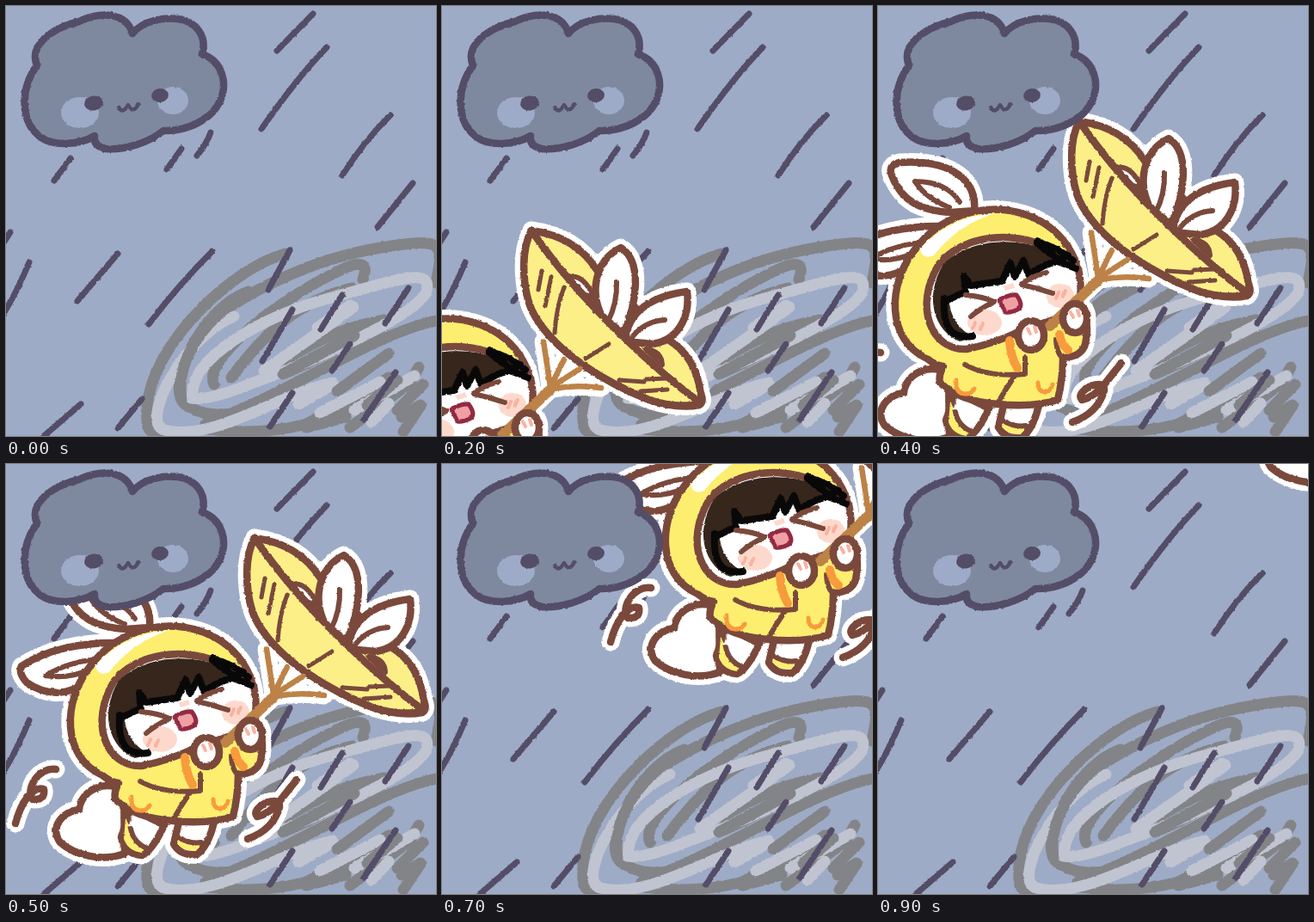
An HTML page for the animation above (1000 ms loop, 500x500 px).

```html
<!DOCTYPE html>
<html lang="en">
<head>
<meta charset="utf-8">
<title>Blown away by the storm</title>
<style>
  html, body { margin: 0; width: 100%; height: 100%; overflow: hidden; background: #9eabc6; }
  svg { display: block; width: 100vw; height: 100vh; }
  path, ellipse { fill: none; stroke-linecap: round; stroke-linejoin: round; }
  .rough { filter: url(#rough); }
  .dark { stroke: #838488; stroke-width: 13; }
  .light { stroke: #c0c4d1; stroke-width: 13; }
  .rain { stroke: #544d68; stroke-width: 7; }
  .cloud { fill: #7e899f; stroke: #544d68; stroke-width: 8.5; }
  .blush { fill: #9eabc8; }
  .eye { fill: #544d68; }
  .line { stroke: #7a493c; stroke-width: 8.5; }
  .thin { stroke: #7a493c; stroke-width: 6; }
  .white { fill: #fff; }
  .yellow { fill: #fdee70; }
  .pale { fill: #fdef88; }
  .pink { fill: #fdd9cd; }
  .orange { stroke: #f79b3c; stroke-width: 5; }
  .cuff { stroke: #f79b3c; stroke-width: 10; }
  .wood { stroke: #bd8247; stroke-width: 6.5; }
  .pole { stroke: #bd8247; stroke-width: 12; }
  .hair { fill: #36261c; }
  .black { stroke: #090808; stroke-width: 8; }
  .mouth { fill: #f0a0a4; stroke: #932a42; stroke-width: 5; }
  .mark { stroke: #f9b29f; stroke-width: 4; }
  .halo * { stroke: #fff; stroke-width: 21; }
  .halo .in { display: none; }
</style>
</head>
<body>
<svg viewBox="0 0 500 500">
  <defs>
    <filter id="rough" filterUnits="userSpaceOnUse" x="-30" y="-30" width="560" height="560" color-interpolation-filters="sRGB">
      <feTurbulence type="fractalNoise" baseFrequency=".25" numOctaves="2" seed="4"/>
      <feDisplacementMap in="SourceGraphic" scale="2.5" xChannelSelector="R" yChannelSelector="G"/>
    </filter>
  </defs>

  <g class="rough">
    <path class="dark" d="M325 288C258 306 150 410 165 490Q172 502 195 496
      M282 332C225 352 180 450 212 466
      M238 366C275 336 350 296 430 282S510 275 500 322
      M242 440C228 415 305 348 385 309Q426 288 415 318
      M262 432C290 395 330 345 402 328
      M500 366C430 380 330 450 232 486
      M205 455C220 485 270 478 330 455
      M325 412Q380 375 440 365M330 425L440 372M345 488Q400 462 445 432
      M400 490L470 438L480 420M462 495L482 465M455 470L485 440M235 492Q330 505 420 460"/>
    <path class="light" d="M265 361C205 385 155 485 184 493C240 508 320 450 380 438
      M217 454C212 410 300 360 375 340S500 300 488 334C470 365 340 420 290 437Q235 460 215 456
      M300 424Q350 390 404 350M362 374L400 348M365 473L435 437M405 470L475 430M340 463L380 440M425 484L445 462"/>
    <path class="dark" d="M204 458C198 420 220 370 282 333M322 428L405 383M385 448L445 404M350 490L395 478M420 464L455 435M460 478L482 464"/>
    <path class="rain" d="M357 9L315 52M373 48Q338 84 297 143M447 127Q417 156 391 197M473 206L432 257
      M75 177L56 203M204 166L187 190M238 147Q233 161 222 174M5 263L-4 277M27 298Q14 330-3 358M130 288L83 343
      M240 285Q200 325 166 370M87 463L44 500M158 457L130 491M330 284L305 330M333 353L298 413M391 336L366 376
      M468 328L441 369M400 393L379 424M333 450L307 489M453 426L416 481"/>
  </g>

  <g id="flyer">
    <g id="girl" class="rough">
      <path class="line" d="M58 355C38 352 22 378 31 390Q46 391 44 378C30 374 17 395 11 418
        M338 367L319 391Q306 407 292 410Q286 403 302 394Q319 388 318 399Q311 425 281 436"/>
      <path class="line white" d="M137 380C118 366 87 378 85 402C66 404 50 422 63 440C80 455 112 463 138 453Z"/>
      <path class="line white" d="M145 400L134 434Q138 454 158 455Q170 450 184 420ZM202 412L195 442Q203 456 222 454Q236 444 243 412Z"/>
      <path class="in yellow" d="M139 412L137 436Q142 450 158 452L162 446Q148 440 144 422ZM199 436Q198 449 221 450L226 442Q212 444 199 436Z"/>
      <path class="in thin" d="M145 424Q148 440 164 447M200 434Q213 442 227 440"/>
      <path class="line white" d="M167 190C170 158 145 130 80 134Q66 137 71 149C83 180 105 190 140 192Z"/>
      <path class="line white" d="M132 208C90 207 48 215 18 235Q14 243 24 254C48 271 80 271 104 243Z"/>
      <path class="in thin" d="M98 156Q135 156 150 180M98 156Q112 177 138 186M46 246Q76 228 112 227M46 246Q74 250 94 240"/>

      <path class="line yellow" d="M289 268C285 235 262 206 225 194C175 178 125 199 98 235C66 275 64 340 112 362Q122 370 131 371Q125 382 127 390Q150 412 195 415Q235 419 264 410Q270 385 270 361Q292 360 296 345Q302 320 290 300Z"/>
      <path class="in white" d="M104 234Q138 197 190 193Q146 208 120 242Q106 248 104 234Z"/>
      <path class="in line white" d="M288 258C250 214 165 206 126 252C96 300 116 353 158 351Q190 345 225 328L280 310Q296 295 288 258Z"/>
      <ellipse class="in pink" cx="179" cy="320" rx="20" ry="15"/>
      <ellipse class="in pink" cx="267" cy="289" rx="16" ry="14"/>
      <path class="in pink" d="M200 278L212 274L214 280L203 283Z"/>
      <path class="in mark" d="M168 320L165 327M177 321L174 328M265 285L262 292M273 283L270 290"/>
      <path class="in hair" d="M286 258C250 220 170 214 131 252C108 290 120 330 150 342L167 337Q140 325 137 292L156 286L155 266L162 278L199 272L209 252L214 267L224 248L230 265L250 254L264 248L286 258Z"/>
      <path class="in black" d="M132 292Q130 322 142 332Q152 338 165 336M136 294L157 284L155 266L163 277L199 272L209 251L214 267L224 248L230 264L250 253L264 249L285 257M240 226Q265 233 282 248M240 228L264 246L276 242"/>
      <path class="in thin" d="M157 288Q178 290 190 296Q175 303 163 313M251 262Q231 267 222 276Q240 280 258 286"/>
      <path class="in mouth" d="M196 294Q207 287 216 288Q224 299 219 304Q210 309 203 308Z"/>

      <path class="in thin" d="M156 369Q183 384 226 380M214 382Q203 398 194 414M160 350Q190 345 215 331M226 380V361M270 361Q263 357 262 340"/>
      <path class="in orange" d="M146 387Q144 401 155 403Q163 404 167 397M241 390Q241 400 249 401Q256 400 258 392"/>
      <path class="in cuff" d="M208 341Q209 360 217 373M266 334Q268 346 276 352"/>

      <path class="line pale" d="M289 86C274 115 280 165 294 187C320 230 376 263 426 283Q460 294 484 289Q490 285 486 276C482 246 468 225 448 213L365 132C350 108 325 91 289 86Z"/>
      <path class="in thin white" d="M332 140Q350 136 362 165L350 160ZM422 224Q440 226 441 242Z"/>
      <path class="line white" d="M371 186C356 156 364 120 393 106C418 122 412 170 396 206Z"/>
      <path class="line white" d="M398 215C400 180 430 162 470 157C474 188 458 214 430 218Z"/>
      <path class="in line pale" d="M289 86C274 115 280 165 294 187C320 230 376 263 426 283Q460 294 486 287C440 253 350 175 289 86Z"/>
      <path class="in thin" d="M388 146Q389 170 378 192M404 213Q418 192 444 190"/>
      <path class="in thin" style="stroke-width:5" d="M301 133L297 155M312 140L305 174M327 152Q318 174 316 205M352 235L379 218M391 260L420 262M416 273L447 271M422 259L447 258"/>
      <path class="wood" d="M303 215L311 268L327 236M312 268L345 247M314 270Q340 265 370 269"/>
      <path class="pole" d="M255 324L312 270"/>
      <ellipse class="line white" cx="233" cy="335" rx="15" ry="17"/>
      <ellipse class="line white" cx="284" cy="315" rx="14" ry="17"/>
      <path class="in mark" d="M229 327L232 333M237 325L239 331M279 308L282 314M287 306L289 312"/>
    </g>
  </g>

  <g class="rough">
    <path class="cloud" d="M36 69C26 45 55 25 85 18C110 6 140 7 147 32C160 16 185 13 200 15C222 18 234 36 228 56C252 64 258 90 249 110C240 132 210 146 183 145C165 160 135 168 116 166Q101 163 103 151C85 162 55 163 41 153C15 135 17 95 36 69Z"/>
    <ellipse class="blush" cx="86" cy="124" rx="22" ry="18"/>
    <ellipse class="blush" cx="194" cy="110" rx="18" ry="16"/>
    <ellipse class="eye" cx="102" cy="113" rx="11" ry="8.5" transform="rotate(-8 102 113)"/>
    <ellipse class="eye" cx="179" cy="104" rx="10" ry="8" transform="rotate(-8 179 104)"/>
    <path class="rain" style="stroke-width:4.5" d="M131 118Q136 126 142 115Q148 126 154 114"/>
  </g>
</svg>
<script>
  const flyer = document.getElementById('flyer');
  const girl = document.getElementById('girl');

  // White sticker border: a thick copy of the outlines behind the drawing
  const halo = girl.cloneNode(true);
  halo.removeAttribute('id');
  halo.classList.add('halo');
  flyer.prepend(halo);

  // Offset per 100 ms step: rushes in, slows in the middle, is swept off
  const steps = [
    [-600, 600], [-290, 282], [-185, 175], [-112, 104], [-55, 48],
    [0, 0], [57, -87], [185, -211], [289, -323], [394, -436]
  ];

  function draw(now) {
    const [x, y] = steps[Math.floor(now % 1000 / 100)];
    flyer.setAttribute('transform', `translate(${x} ${y})`);
    requestAnimationFrame(draw);
  }
  draw(performance.now());
</script>
</body>
</html>
```
